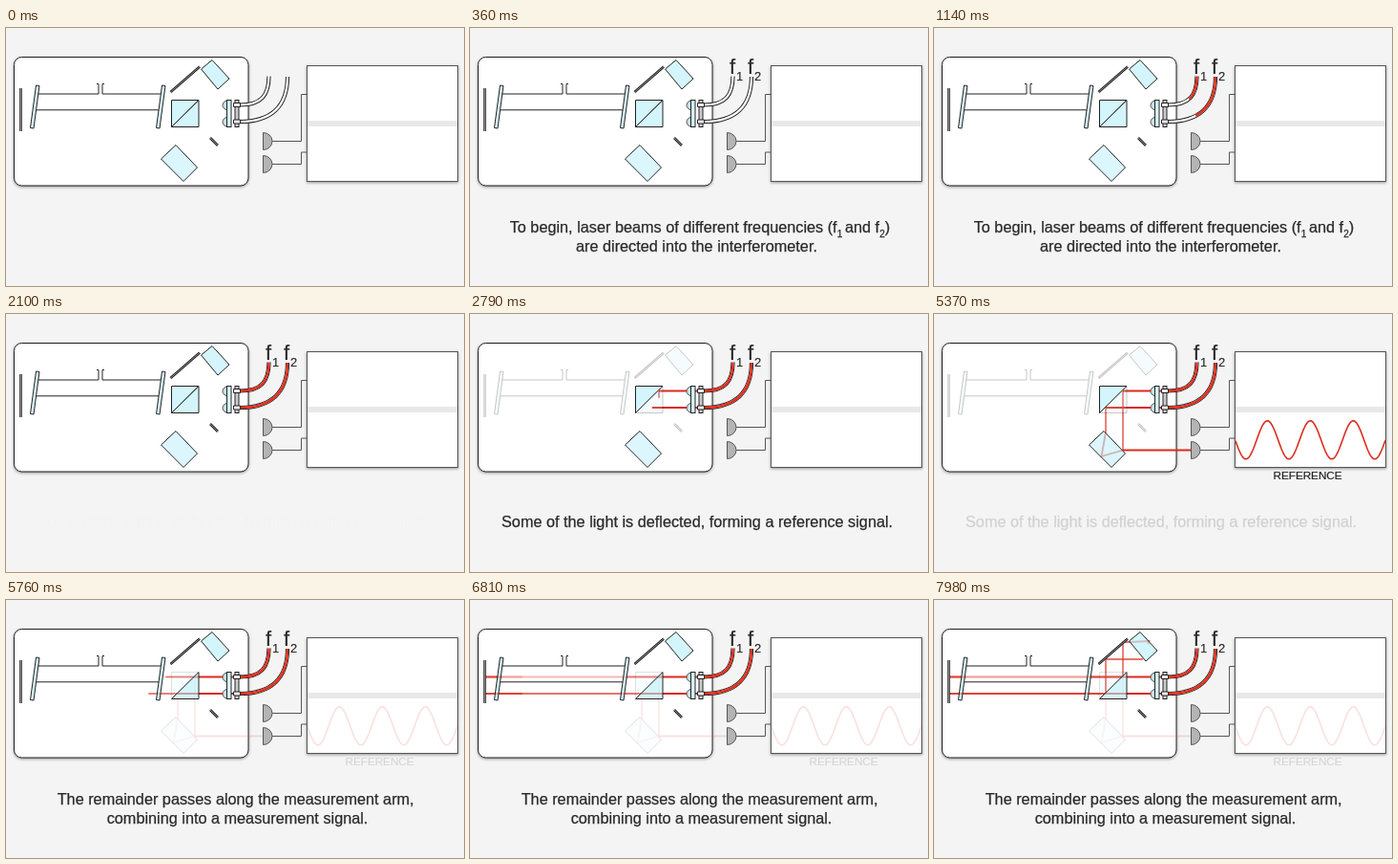
Write an HTML page that moves like this. It is 480x270 px and loops after 8 s.

```html
<!DOCTYPE html>
<html lang="en">
<head>
<meta charset="utf-8">
<title>Interferometer</title>
<style>
html, body { margin: 0; width: 100%; height: 100%; overflow: hidden; background: #f4f4f4; }
svg { display: block; width: 480px; height: 270px; font-family: "Liberation Sans", Arial, sans-serif; }
path, rect { fill: none; stroke: #222; }
.panel { fill: #fff; filter: drop-shadow(0 1px 1.5px rgba(0, 0, 0, .4)); }
.glass { fill: #b8eefa; fill-opacity: .6; }
.grey { fill: #b4b4b4; stroke: #555; }
.mirror { stroke: #222; stroke-width: 2.6; }
.shine { stroke: #999; stroke-width: .9; }
.wire { stroke: #555; }
.beam path, #sine { stroke: #dc2a1e; stroke-width: 2; }
.beam .split { stroke-width: 1.8; stroke-opacity: .65; }
.fibre path { stroke-width: 4.2; }
.fibre .core { stroke: #fff; stroke-width: 2.2; }
.fibre .light { stroke: #e8301e; stroke-width: 2.4; }
.caption { font-size: 16.26px; fill: #2a2a2a; stroke: #2a2a2a; stroke-width: .25; }
.sub { font-size: 10px; }
#labels { font-size: 22px; fill: #2a2a2a; stroke: #2a2a2a; stroke-width: .15; }
#labels .index { font-size: 13px; }
#title { font-size: 11.7px; fill: #222; stroke: #222; stroke-width: .2; }
#sine { stroke-width: 1.6; }
</style>
</head>
<body>
<svg viewBox="0 0 480 270">
  <rect class="panel" x="8.5" y="30.5" width="245.5" height="134.5" rx="8"/>
  <rect class="panel" style="stroke:#555" x="315.5" y="39.5" width="158" height="121"/>
  <rect x="316" y="97" width="157" height="6" style="fill:#e8e8e8;stroke:none"/>

  <path class="wire" d="M279 118.5H309.500V69.500H315M279 142.500H309.500V130H315"/>

  <g class="fibre">
    <path d="M275.500 50.500C275.500 70 268 80.500 245 80.500M295 51C295 82 278 98 245 98"/>
    <path class="core" d="M275.500 50C275.500 70 268 80.500 245 80.500M295 50.500C295 82 278 98 245 98"/>
    <path class="light" data-start="720" data-speed=".062" d="M275.500 50.500C275.500 70 268 80.500 245 80.500"/>
    <path class="light" data-start="720" data-speed=".115" d="M295 51C295 82 278 98 245 98"/>
  </g>

  <g class="beam">
    <path data-start="2490" d="M245 80.500H198"/>
    <path data-start="2490" d="M245 98H180"/>
    <path class="split" data-start="5590" d="M198 80.500H16"/>
    <path class="split" data-start="5590" d="M180 98H16"/>
    <path class="split" data-start="6595" d="M16 80.500H198V44H205L225.500 43L219 61V118.500H269"/>
    <path class="split" data-start="6595" d="M16 98H180V62H219"/>
  </g>

  <g id="reference">
    <g class="beam">
      <path class="split" data-start="2751" d="M198 80.500V142.500"/>
      <path class="split" data-start="2851" d="M180 98V124L175.500 149L198 142.500"/>
      <path data-start="3095" d="M198 142.500H269"/>
    </g>
    <path class="glass" d="M173.500 75.500H202L173.500 103.500Z"/>
    <path class="glass" style="fill-opacity:.5" d="M162.500 137L178 122.500L200.500 146L186 160.500Z"/>
    <polyline id="sine" fill="none"/>
    <text id="title" x="355.500" y="172.800">REFERENCE</text>
  </g>

  <g id="arm">
    <path style="fill:#fff;fill-opacity:.5;stroke:none" d="M33 69H162V86H33Z"/>
    <path d="M33 69H97V58.500H95M103 58.500H101V69H162M32 85.800H160"/>
    <path class="glass" d="M31.500 60L35 60.500L29 105L25.500 104.500Z"/>
    <path class="glass" d="M163.500 60L167 60.500L161 105L157.500 104.500Z"/>
    <path class="mirror" d="M15.500 63V108M172.500 67L203 40.500M214 115L222 123"/>
    <path class="shine" d="M15.500 63V108M172.500 67L203 40.500M214 115L222 123"/>
    <path class="glass" d="M204.500 43L216 33.500L234 53L222 64Z"/>
    <path class="glass" d="M202 75.500V103.500H173.500Z"/>
  </g>

  <path class="grey" d="M269.500 109.500a9.500 9 0 0 1 0 18zM269.500 133.500a9.500 9 0 0 1 0 18z"/>
  <path class="grey" style="fill:#c8dfe6" d="M232 76a5 4.800 0 0 0 0 9.600zM232 93.500a5 4.800 0 0 0 0 9.600z"/>
  <rect class="glass" style="fill-opacity:1;fill:#d4f4fb" x="231.500" y="75.500" width="4.500" height="28"/>
  <rect x="240" y="75.500" width="4" height="28" style="fill:#ccc"/>
  <path style="fill:#eee" d="M238.500 78.500h7v4h-7zM238.500 96h7v4h-7z"/>

  <g id="labels">
    <text x="272" y="48">f<tspan class="index" x="279" y="55">1</tspan></text>
    <text x="291" y="48">f<tspan class="index" x="298" y="55">2</tspan></text>
  </g>

  <g class="caption">
    <text x="41.700" y="214.400">To begin, laser beams of different frequencies (f<tspan class="sub" dy="5">1 </tspan><tspan dy="-5">and f</tspan><tspan class="sub" dy="5">2</tspan><tspan dy="-5">)</tspan></text>
    <text x="111" y="234.400">are directed into the interferometer.</text>
  </g>
  <g class="caption">
    <text x="33" y="223.400">Some of the light is deflected, forming a reference signal.</text>
  </g>
  <g class="caption">
    <text x="53.700" y="214.400">The remainder passes along the measurement arm,</text>
    <text x="105.700" y="234.400">combining into a measurement signal.</text>
  </g>
</svg>
<script>
const LOOP = 8000, BEAM_SPEED = 0.18;
const $ = id => document.getElementById(id);
const rays = [...document.querySelectorAll('[data-start]')];
const captions = document.querySelectorAll('.caption');
const captionTimes = [[30, 330, 1710, 1950], [2100, 2400, 5180, 5410], [5430, 5700, 8001, 8002]];

const ramp = (t, a, b) => Math.min(1, Math.max(0, (t - a) / (b - a)));

function sinePoints(end) {
  const points = [];
  for (let x = 316; x <= end; x++) {
    points.push(x + ',' + (131.8 - 20 * Math.cos((x - 349.4) / 45 * 2 * Math.PI)).toFixed(2));
  }
  return points.join(' ');
}

function draw(t) {
  for (const ray of rays) {
    const { start, speed = BEAM_SPEED } = ray.dataset;
    const length = Math.max(0, (t - start) * speed);
    ray.style.visibility = length ? 'visible' : 'hidden';
    ray.style.strokeDasharray = length + ' 9999';
  }
  captions.forEach((caption, i) => {
    const [a, b, c, d] = captionTimes[i];
    caption.style.opacity = ramp(t, a, b) - ramp(t, c, d);
  });
  const swap = ramp(t, 5410, 5700);
  $('labels').style.opacity = ramp(t, 30, 330);
  $('arm').style.opacity = 1 - 0.75 * (ramp(t, 2100, 2400) - swap);
  $('reference').style.opacity = 1 - 0.86 * swap;
  $('title').style.opacity = ramp(t, 4790, 5050);
  $('sine').setAttribute('points', t > 3490 ? sinePoints(316 + 157 * ramp(t, 3490, 4790)) : '');
}

function tick() {
  draw(performance.now() % LOOP);
  requestAnimationFrame(tick);
}
tick();
</script>
</body>
</html>
```
